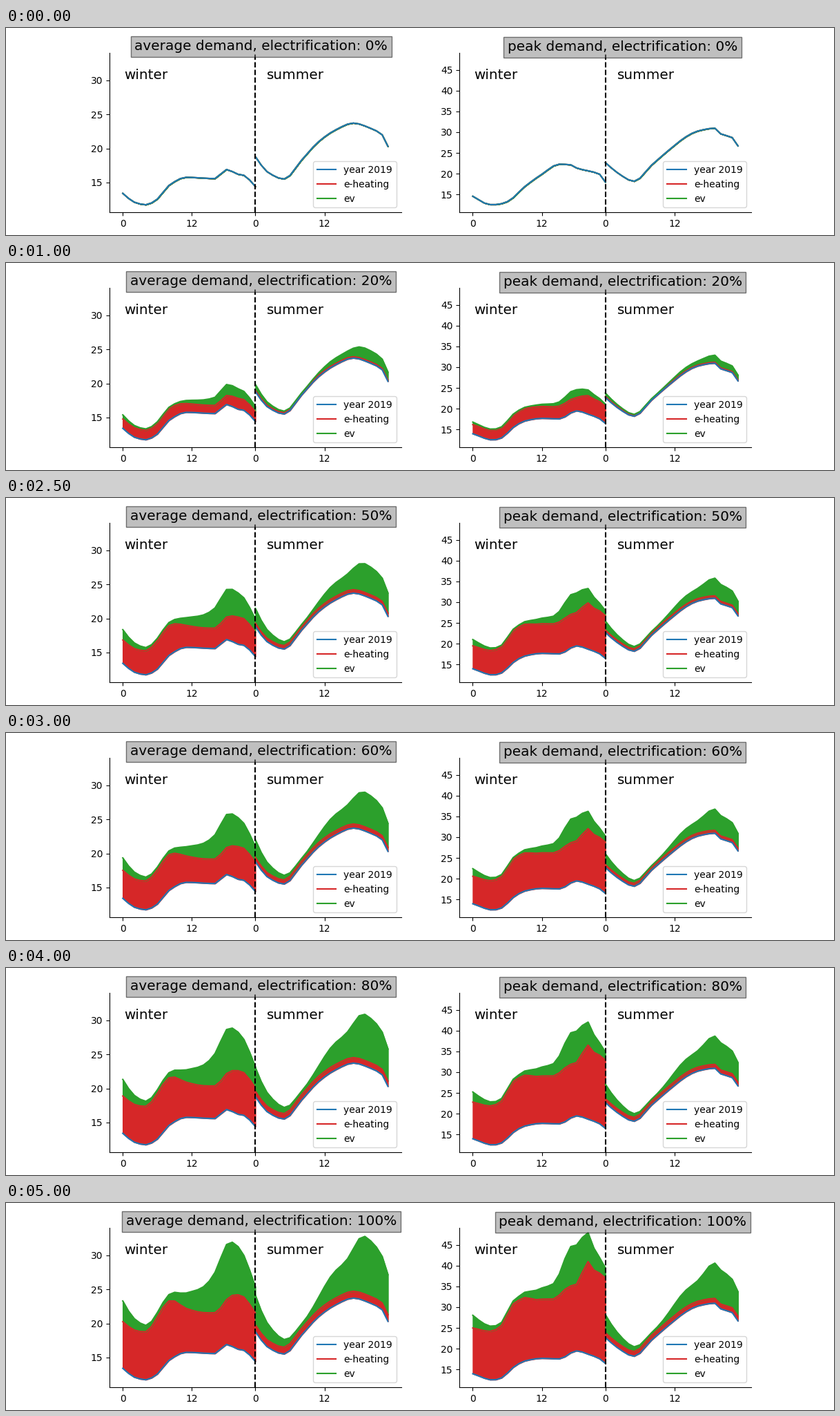
These frames come from a looping animation (1200 by 300 pixels, 5500 ms). A matplotlib script:

```python
import numpy as np
import matplotlib.pyplot as plt
from matplotlib.animation import FuncAnimation

plt.rcParams["font.family"] = "DejaVu Sans"

HOURS = np.arange(24)
SUMMER_START = 23
BLUE, RED, GREEN = "tab:blue", "tab:red", "tab:green"


def smooth(*points):
    """Hourly profile through key points, without overshoot between them."""
    x, y = np.transpose(points)
    secant = np.diff(y) / np.diff(x)
    a, b = secant[:-1], secant[1:]
    rising = a * b > 0
    inner = np.where(rising, 2 * a * b / np.where(rising, a + b, 1), 0)
    slope = np.r_[secant[0], inner, secant[-1]]
    i = np.clip(np.searchsorted(x, HOURS, "right") - 1, 0, len(x) - 2)
    width = x[i + 1] - x[i]
    t = (HOURS - x[i]) / width
    return (y[i] + (y[i + 1] - y[i]) * t**2 * (3 - 2 * t)
            + width * t * (1 - t) * ((1 - t) * slope[i] - t * slope[i + 1]))


def bump(peak, height, rise, fall):
    """Bell curve that is wider on one side."""
    spread = np.where(HOURS < peak, rise, fall)
    return height * np.exp(-((HOURS - peak) / spread) ** 2 / 2)


def charging(night, decay, *bumps):
    """Night charging that dies away, then daytime and evening arrivals."""
    return night * np.exp(-HOURS / decay) + sum(bump(*b) for b in bumps)


class Day:
    """Base load, and what full electrification adds to it."""

    def __init__(self, base, heating, ev):
        self.base, self.heating, self.ev = base, heating, ev

    def levels(self, share):
        heated = self.base + share * self.heating
        return self.base, heated, heated + share * self.ev


winter_noon = (13.5, 2.9, 3.2, 3.2)
winter_ev = charging(3.05, 3.3, winter_noon, (18.5, 7.2, 2.2, 4.0))
cold_ev = charging(3.05, 3.3, winter_noon, (17.6, 8.4, 1.65, 3.4))
summer_ev = charging(4.35, 3.7, (14, 3.6, 2.4, 2.0), (19, 8.3, 2.0, 4.8))

mean_winter = Day(
    smooth((0, 13.4), (2, 12.1), (4, 11.72), (6, 12.55), (8, 14.55), (11, 15.75),
           (16, 15.57), (18, 16.9), (20, 16.2), (21, 16.05), (23, 14.4)),
    smooth((0, 6.85), (4, 7.05), (7, 8.8), (8, 8.75), (11, 6.45), (14, 5.95),
           (17, 6.05), (20, 8.0), (23, 7.1)),
    winter_ev)

mean_summer = Day(
    smooth((0, 18.8), (2, 16.6), (5, 15.5), (8, 18.25), (11, 21.0), (14, 22.75),
           (17, 23.72), (20, 22.95), (22, 22.0), (23, 20.3)),
    1.0, summer_ev)

peak_mild = Day(
    smooth((0, 14.6), (3, 12.6), (4, 12.6), (6, 13.3), (9, 16.9), (12, 19.9),
           (15, 22.3), (17, 22.15), (18, 21.4), (22, 19.9), (23, 18.0)),
    1.5, winter_ev)

peak_cold = Day(
    smooth((0, 14.0), (3.5, 12.5), (5, 13.0), (7, 15.5), (9, 17.05), (12, 17.7),
           (15, 17.57), (18, 19.5), (20, 18.7), (22, 17.6), (23, 16.5)),
    smooth((0, 11.0), (3, 11.65), (5, 12.6), (7, 15.25), (9, 15.25), (11, 14.2),
           (14, 14.35), (16, 16.2), (18, 16.0), (20, 22.25), (21, 20.7), (23, 20.5)),
    cold_ev)

peak_summer = Day(
    smooth((0, 22.7), (2, 20.35), (5, 18.2), (8, 22.05), (12, 26.8), (14, 28.9),
           (16, 30.25), (19, 30.95), (20, 29.6), (22, 28.7), (23, 26.7)),
    1.15, summer_ev)


def draw_day(ax, start, day, share):
    x = HOURS + start
    base, heated, total = day.levels(share)
    ax.fill_between(x, base, heated, color=RED)
    ax.fill_between(x, heated, total, color=GREEN)
    ax.plot(x, heated, color=RED)
    ax.plot(x, total, color=GREEN)
    ax.plot(x, base, color=BLUE)


def draw_panel(ax, name, winter, summer, share, ylim, yticks, title_at):
    ax.clear()
    draw_day(ax, 0, winter, share)
    draw_day(ax, SUMMER_START, summer, share)
    ax.axvline(SUMMER_START, color="black", ls="--")

    ax.set_xlim(-2.3, 48.3)
    ax.set_ylim(ylim)
    ax.set_xticks([0, 12, SUMMER_START, SUMMER_START + 12], [0, 12, 0, 12])
    ax.set_yticks(yticks)
    ax.spines[["top", "right"]].set_visible(False)

    ax.text(0.05, 0.835, "winter", size="x-large", transform=ax.transAxes)
    ax.text(0.54, 0.835, "summer", size="x-large", transform=ax.transAxes)
    ax.text(*title_at, f"{name} demand, electrification: {share:.0%}", size="x-large",
            ha="center", bbox=dict(facecolor="grey", alpha=0.5))

    entries = (("year 2019", BLUE), ("e-heating", RED), ("ev", GREEN))
    handles = [plt.Line2D([], [], color=color, label=label) for label, color in entries]
    ax.legend(handles=handles, loc="lower right")


fig, (mean_ax, peak_ax) = plt.subplots(1, 2, figsize=(12, 3), dpi=100)


def update(step):
    share = step / 10
    # The peak winter day switches to a cold one once heating dominates.
    peak_winter = peak_mild if step < 2 else peak_cold
    draw_panel(mean_ax, "average", mean_winter, mean_summer, share,
               (10.624, 34.04), range(15, 31, 5), (24, 34.4))
    draw_panel(peak_ax, "peak", peak_winter, peak_summer, share,
               (10.763, 49.063), range(15, 46, 5), (26, 49.5))
    return []


animation = FuncAnimation(fig, update, frames=11, init_func=lambda: [],
                          interval=500, repeat=True)
plt.show()
```
